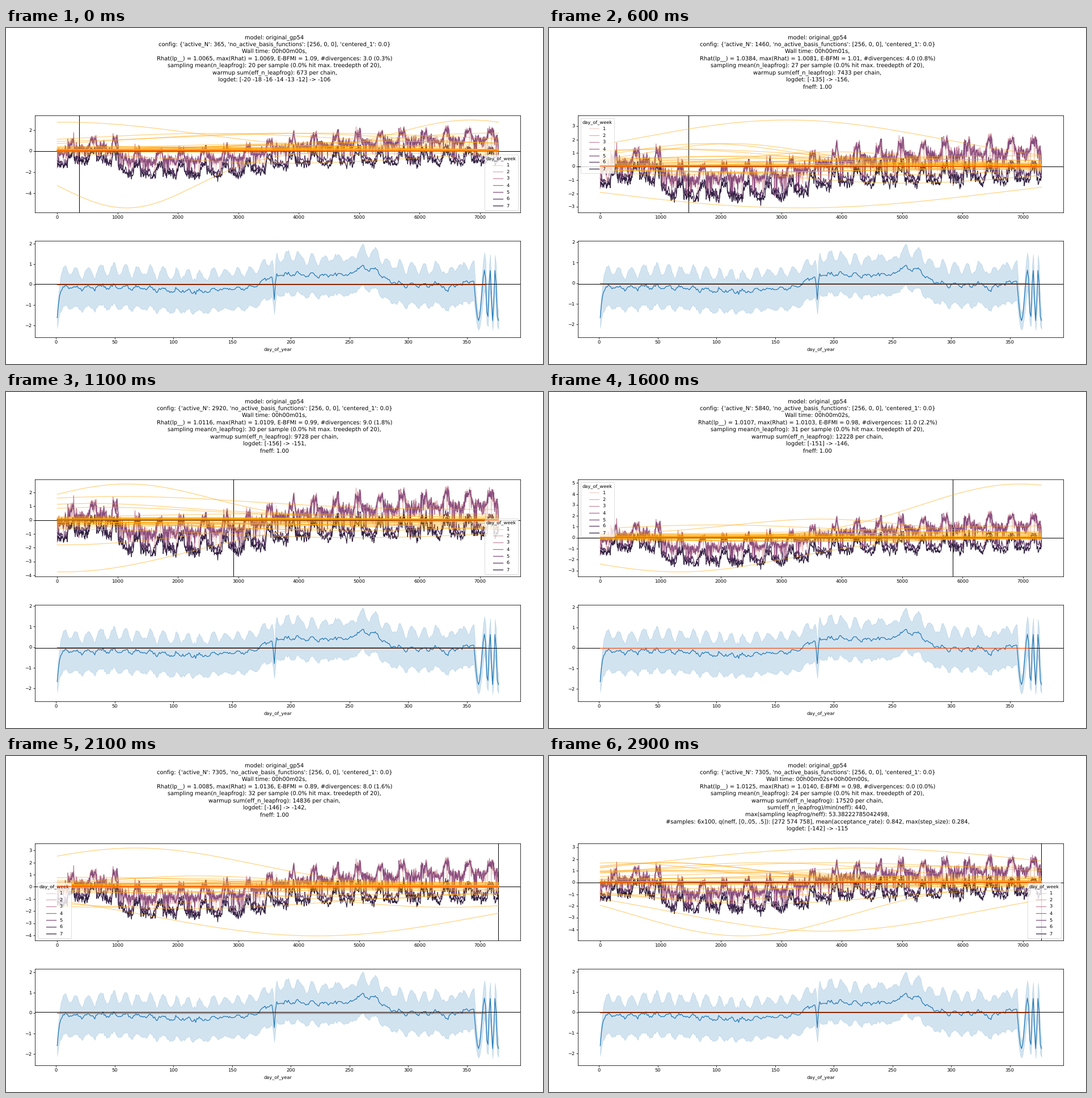
Animation, 947 px wide and 592 px high, one loop 3.1 s. Source, as a matplotlib script:

```python
import numpy as np
import matplotlib as mpl
import matplotlib.pyplot as plt
from matplotlib.animation import FuncAnimation

W, H = 947, 592
PT = W / 16 / 72          # drawn at 72 dpi, so one point is one pixel
STEP = 100                # ms per animation step
N_DAYS = 7305
N_CURVES = 34

mpl.rcParams.update({
    "font.family": "DejaVu Sans",
    "font.size": 10 * PT,
    "text.hinting": "none",
    "axes.linewidth": 0.8,
    "lines.linewidth": 1.5 * PT,
    "legend.title_fontsize": 10 * PT,
    "patch.linewidth": 1.0 * PT,
    "axes.labelpad": 4 * PT,
})
for side in ("xtick", "ytick"):
    mpl.rcParams[side + ".major.size"] = 3.5 * PT
    mpl.rcParams[side + ".major.pad"] = 3.5 * PT
    mpl.rcParams[side + ".major.width"] = 0.8


def stage(n, wall, rhat, rmax, bfmi, div, leap, warm, tail, shift, loc, *waves):
    """One fit: report text, mean shift, legend place and outermost curves.

    Each wave is (peak value, peak position in 1000 days, width).
    """
    text = [
        "model: original_gp54",
        f"config: {{'active_N': {n}, 'no_active_basis_functions': "
        "[256, 0, 0], 'centered_1': 0.0}",
        f"Wall time: {wall},",
        f"Rhat(lp__) = {rhat}, max(Rhat) = {rmax}, E-BFMI = {bfmi}, "
        f"#divergences: {div}",
        f"sampling mean(n_leapfrog): {leap} per sample "
        "(0.0% hit max. treedepth of 20),",
        f"warmup sum(eff_n_leapfrog): {warm} per chain,",
    ] + tail
    return dict(n=n, text=text, shift=shift, loc=loc, waves=waves)


def logdet(before, after):
    return [f"logdet: [{before}] -> {after},", "fneff: 1.00"]


STAGES = [
    stage(365, "00h00m00s", "1.0065", "1.0069", "1.09", "3.0 (0.3%)", 20, 673,
          ["logdet: [-20 -18 -16 -14 -13 -12] -> -106"], .03, "lower right",
          (2.95, 6.85, 1.2), (2.75, .1, 2.2), (-5.4, 1.15, 1.15)),
    stage(730, "00h00m00s", "1.0395", "1.0132", "0.96", "8.0 (1.6%)", 41, 4027,
          logdet(-106, -135), 0, "lower left",
          (3.05, 1.2, 1.4), (2.5, 5.2, 1.7)),
    stage(1460, "00h00m01s", "1.0384", "1.0081", "1.01", "4.0 (0.8%)", 27, 7433,
          logdet(-135, -156), -.03, "upper left",
          (3.45, 3.1, 2.5), (-3.07, 3.3, 3.4)),
    stage(2920, "00h00m01s", "1.0116", "1.0109", "0.99", "9.0 (1.8%)", 30, 9728,
          logdet(-156, -151), -.03, "lower right",
          (2.6, 1.15, 1.4), (-3.75, .1, 2.1)),
    stage(5840, "00h00m02s", "1.0107", "1.0103", "0.98", "11.0 (2.2%)", 31,
          12228, logdet(-151, -146), 0, "upper left",
          (4.9, 6.95, 1.65), (-3.12, 1.3, 1.8)),
    stage(7305, "00h00m02s", "1.0085", "1.0136", "0.89", "8.0 (1.6%)", 32,
          14836, logdet(-146, -142), .065, "lower left",
          (3.2, 1.3, 1.9), (-4.05, 4.3, 2.7)),
    stage(7305, "00h00m02s+00h00m00s", "1.0125", "1.0140", "0.98",
          "0.0 (0.0%)", 24, 17520,
          ["sum(eff_n_leapfrog)/min(neff): 440,",
           "max(sampling leapfrog/neff): 53.38222785042498,",
           "#samples: 6x100, q(neff, [0,.05, .5]): [272 574 758], "
           "mean(acceptance_rate): 0.842, max(step_size): 0.284,",
           "logdet: [-142] -> -115"], .037, "lower right",
          (2.95, 4.2, 3.2), (-4.55, 2.35, 1.8), (-4.15, 3.7, 2.5)),
]


def bump(x, center, width):
    return np.exp(-((x - center) / width) ** 2)


def rise(x, center, width):
    return 1 / (1 + np.exp(-(x - center) / width))


def annual(doy):
    """Smooth yearly pattern: spring low, summer plateau, September peak."""
    return (-.15 - .2 * bump(doy, 115, 35) + .6 * rise(doy, 176, 4)
            + .33 * rise(doy, 254, 1.5) - .84 * rise(doy, 279, 4))


def smooth_noise(rng, size, width):
    kernel = np.hanning(width + 2)
    kernel /= np.sqrt((kernel ** 2).sum())
    return np.convolve(rng.normal(size=size), kernel, "same")


def hue(k):
    """Cubehelix colour of weekday k, pale for 1 and dark for 7."""
    x = np.interp(k, (1, 7), (0.85, 0.15))
    amp, phi = 0.4 * x * (1 - x), 0.8 * np.pi * x
    weights = np.array([(-.14861, 1.78277), (-.29227, -.90649), (1.97294, 0)])
    return np.clip(x + amp * weights @ (np.cos(phi), np.sin(phi)), 0, 1)


def daily_series():
    rng = np.random.default_rng(54)
    day = np.arange(1, N_DAYS + 1)
    t = day / 1000
    dow = (day + 1) % 7 + 1
    doy = (day - 1) % 365.25 + 1
    work = dow < 6

    value = .02 + .18 * t + .45 * bump(t, .65, .35)
    value -= rise(t, 1.05, .06) * rise(-t, -3.55, .2)
    value += 1.25 * annual(doy) + .14 * smooth_noise(rng, N_DAYS, 25)
    value += rng.normal(0, .15, N_DAYS) + .1 * (dow == 2) - .08 * (dow == 1)
    gap = 1.1 + .14 * t
    value -= gap * ((dow == 7) + .8 * (dow == 6))

    # public holidays and odd days break out of the weekday level
    holiday = (abs(doy - 185) <= 1) | (doy <= 2) | (doy >= 358.5)
    holiday |= ((abs(doy - 149) < 4) | (abs(doy - 247) < 4)) & (dow == 1)
    holiday |= (abs(doy - 328) < 4) & (dow == 4)
    value -= gap * rng.uniform(.6, 1.05, N_DAYS) * (holiday & work)
    luck = rng.random(N_DAYS)
    value -= rng.uniform(.2, 1.1, N_DAYS) * ((luck < .04) & work)
    value += rng.uniform(.2, .7, N_DAYS) * ((luck > .98) & work)
    return day, dow, np.clip(value, -3.05, 2.45)


def yearly_profile():
    """Mean and band of the day-of-year effect."""
    rng = np.random.default_rng(7)
    day = np.arange(1, 378)
    ripple = np.sin(2 * np.pi * day / 10.6 - 2.2)
    ripple += .35 * smooth_noise(rng, day.size, 5)
    mean = annual(day) + .08 * ripple + rng.normal(0, .045, day.size)
    mean += .25 * bump(day, 352, 4) - .3 * bump(day, 333, 3)
    mean -= 1.4 * np.exp((1 - day) / 1.6) + 1.3 * bump(day, 186, 1)

    # the year's end swings ever faster
    phase = np.interp(day, [356, 360, 365.4, 376.4], [.33, 1, 2, 7])
    swing = -.55 + 1.25 * np.cos(np.pi * phase)
    mean = np.where(day > 356, swing, mean)

    fit = np.where(mean < -.5, 1 + .3 * mean, 1)
    upper = mean + fit * (.84 + .18 * ripple)
    lower = mean - fit * (.97 - .04 * ripple)
    return day, mean, lower, upper


GRID = np.linspace(1, N_DAYS, 160)


def curves(index):
    """Basis curves of a stage: the outermost, then small random ones."""
    rng = np.random.default_rng(100 + index)
    t = GRID / 1000
    waves = [peak * np.exp(-((t - pos) / width) ** 2 / 2)
             for peak, pos, width in STAGES[index]["waves"]]
    while len(waves) < N_CURVES:
        scale = .65 if len(waves) < 26 else .05
        peak = np.clip(rng.laplace(.1, scale), -1.8, 1.7)
        pos, width = rng.uniform(0, 7.3), rng.uniform(1.2, 2.6)
        base = peak * rng.uniform(-.1, .5)
        waves.append(base + (peak - base)
                     * np.exp(-((t - pos) / width) ** 2 / 2))
    return waves


def panel(top, bottom, last):
    left, right = 51.4, 907.4
    ax = fig.add_axes([left / W, 1 - bottom / H,
                       (right - left) / W, (bottom - top) / H])
    pad = 0.05 * (last - 1)
    ax.set_xlim(1 - pad, last + pad)
    return ax


fig = plt.figure(figsize=(W / 72, H / 72), dpi=72, facecolor="white")
ax_top = panel(154.4, 324.7, N_DAYS)
ax_low = panel(374.9, 545.2, 377)

day, dow, value = daily_series()
for k in range(1, 8):
    pick = dow == k
    ax_top.plot(day[pick], value[pick], color=hue(k), label=str(k))
ax_top.axhline(0, color="black", lw=1)
marker = ax_top.axvline(365, color="black", lw=1)
basis = [ax_top.plot(GRID, 0 * GRID, color="orange", alpha=0.5)[0]
         for _ in range(N_CURVES)]
ax_top.plot([1, N_DAYS], [.03, 0], color="orangered", zorder=6)
legend = ax_top.legend(title="day_of_week", loc="lower right")
ax_top.set_xticks(range(0, 7001, 1000))

yday, mean, lower, upper = yearly_profile()
ax_low.fill_between(yday, lower, upper, color="#1f77b4", alpha=0.2)
ax_low.plot(yday, mean, color="#1f77b4")
ax_low.axhline(0, color="black", lw=1)
ax_low.set_xticks(range(0, 351, 50))
ax_low.set_xlabel("day_of_year")
fit_low, = ax_low.plot([1, 366], [0, 0], color="orangered")

title = [fig.text(0.5, 1 - (19.4 + 12.43 * i) / H, "", ha="center",
                  va="baseline", fontsize=12 * PT) for i in range(10)]
CURVES = [curves(i) for i in range(len(STAGES))]


def draw(step):
    index = (step + 4) // 5
    s = STAGES[index]
    for i, line in enumerate(title):
        line.set_text(s["text"][i] if i < len(s["text"]) else "")

    peaks = [wave[0] for wave in s["waves"]]
    lo, hi = min(peaks + [value.min()]), max(peaks)
    pad = 0.05 * (hi - lo)
    lo, hi = lo - pad, hi + pad
    gap = 2 if hi - lo > 9 else 1
    first = int(np.ceil(lo / gap)) * gap
    ax_top.set_yticks(range(first, int(np.floor(hi)) + 1, gap))
    ax_top.set_ylim(lo, hi)
    marker.set_xdata([s["n"]] * 2)
    for line, y in zip(basis, CURVES[index]):
        line.set_ydata(y)
    legend.set_loc(s["loc"])

    # the profile stays put while its scale slides by the stage's mean shift
    ticks = np.arange(-2, 3)
    ax_low.set_yticks(ticks - s["shift"], [str(t).replace("-", "\u2212")
                                           for t in ticks])
    ax_low.set_ylim(-2.625, 2.1)
    fit_low.set_ydata([-s["shift"]] * 2)
    return []


anim = FuncAnimation(fig, draw, frames=31, interval=STEP, repeat=True,
                     repeat_delay=0, blit=False)
plt.show()
```
